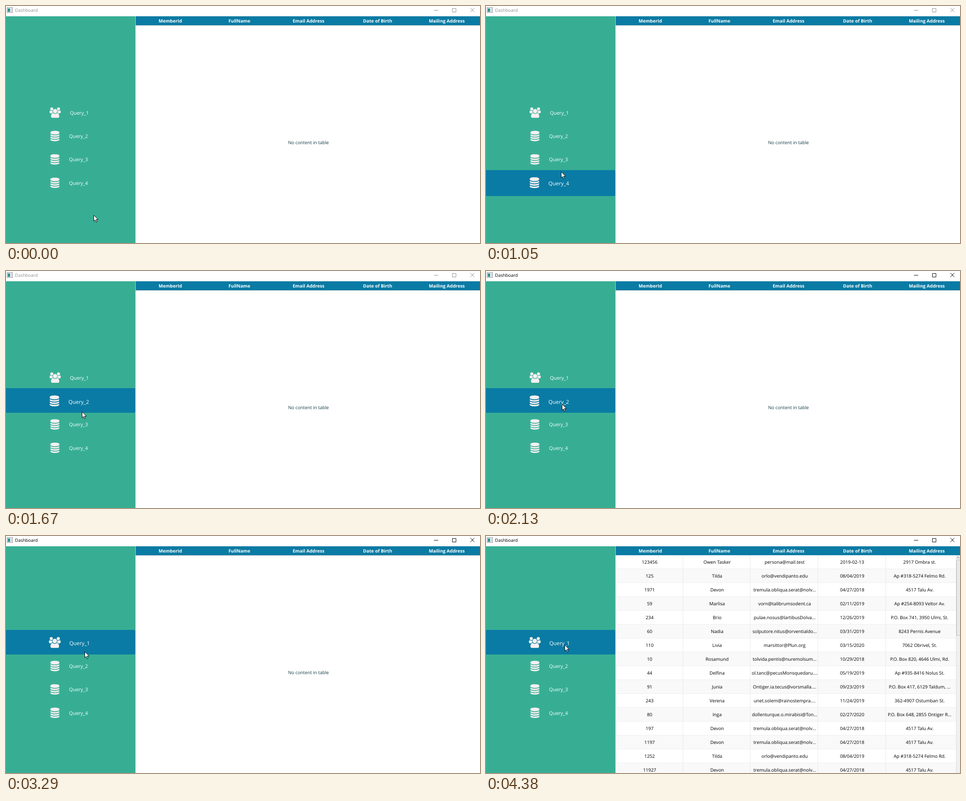
These frames come from a looping animation (1056 by 530 pixels, 5000 ms). An HTML page:

```html
<!DOCTYPE html>
<html lang="en">
<head>
<meta charset="utf-8">
<title>Dashboard</title>
<style>
  html, body { margin: 0; width: 100%; height: 100%; overflow: hidden; background: #fff; }
  svg { display: block; width: 1056px; height: 530px; }
  text { font: 500 10.2px "Open Sans", "Noto Sans", sans-serif; fill: #000; text-rendering: geometricPrecision; }
  .mid { text-anchor: middle; }
  .head { font-size: 10.1px; font-weight: 700; fill: #fff; }
  .item text { font-size: 10.8px; fill: #fff; }
  .item.on text { font-size: 11.8px; }
  .icon { fill: #f5f0f1; }
  #empty { fill: #123c46; }
  #frame text { font-size: 9.9px; fill: #8e8e8e; }
  #frame path { fill: none; stroke: #8e8e8e; }
  #frame.active text { fill: #000; }
  #frame.active path { stroke: #000; }
</style>
</head>
<body>
<svg viewBox="0 0 1056 530">
  <defs>
    <g id="people">
      <g id="side">
        <circle cx="384" cy="256" r="256"/>
        <path d="M593 896q-162 5-265 128H194Q0 1024 0 865q0-353 124-353C160 515 260 597 384 597q67 0 133-23-28 170 76 322z"/>
      </g>
      <use href="#side" transform="matrix(-1 0 0 1 1920 0)"/>
      <circle cx="960" cy="640" r="370"/>
      <path d="M602 970C700 980 780 1110 960 1110S1220 980 1318 970C1540 970 1664 1230 1664 1533Q1664 1792 1397 1792H523Q256 1792 256 1533C256 1230 380 970 602 970z"/>
    </g>
    <g id="data">
      <path d="M768 0q208 0 385 34.5t280 93.5 103 128v128q0 69-103 128t-280 93.5-385 34.5-385-34.5-280-93.5-103-128v-128q0-69 103-128t280-93.5 385-34.5z"/>
      <path id="band" d="M768 768q237 0 443-43t325-127v170q0 69-103 128t-280 93.5-385 34.5-385-34.5-280-93.5-103-128v-170q119 84 325 127t443 43z"/>
      <use href="#band" y="384"/>
      <use href="#band" y="768"/>
    </g>
  </defs>

  <rect width="1056" height="530" fill="#fff"/>
  <g id="frame">
    <rect x="2.5" y="3.5" width="12" height="11" fill="#f4f6f6" stroke="#858b8d"/>
    <rect x="4" y="5.5" width="5" height="7.5" fill="#2d8a93"/>
    <rect x="10.5" y="5.5" width="2.5" height="7.5" fill="#cfd6d8"/>
    <text x="20" y="13">Dashboard</text>
    <path d="M953.5 9.5h9.5M994.5 5.5h8v8h-8zM1034.5 4.5l9 9m0-9l-9 9"/>
  </g>

  <rect y="23" width="288" height="507" fill="#37ae94"/>
  <path d="M288.5 23V530M289 43.5H1056" stroke="#c8c8c8"/>
  <path id="glow" fill="#0a7ba4"/>
  <g id="menu"></g>

  <rect x="289" y="23" width="767" height="20" fill="#0a7ba4"/>
  <g id="heads"></g>
  <text id="empty" class="mid" x="673.8" y="308.5">No content in table</text>
  <g id="table">
    <g id="rows"></g>
    <rect x="1048" y="43" width="8" height="487" fill="#f0f0f0"/>
    <path d="M1047.5 43V530" stroke="#dcdcdc"/>
    <path d="M1049.5 49.5l2.5-3 2.5 3" fill="none" stroke="#666"/>
    <rect x="1048.5" y="53.5" width="8" height="169" rx="1" fill="#e9e9e9" stroke="#b9b9b9"/>
  </g>

  <g id="cursor">
    <path d="M.5 .8V14.2L3.6 11.3 5.9 16.6 8 15.7 5.8 10.5H10.2z" fill="#fff" stroke="#000"/>
    <circle id="click" cx=".3" r="10.9" fill="#ff0" fill-opacity=".47"/>
  </g>
</svg>
<script>
const LOOP = 5000, TICK = 75;
const ROW = 52.3, TOP = 210;
const $ = id => document.getElementById(id);

function add(parent, tag, attrs, label) {
  const el = document.createElementNS("http://www.w3.org/2000/svg", tag);
  for (const key in attrs) el.setAttribute(key, attrs[key]);
  if (label) el.textContent = label;
  return parent.appendChild(el);
}

// Side menu: the hovered item grows a little around its centre
const items = [0, 1, 2, 3].map(i => {
  const g = add($("menu"), "g", { class: "item" });
  const icon = add(g, "use", { class: "icon", href: i ? "#data" : "#people" });
  const label = add(g, "text", {}, "Query_" + (i + 1));
  return { g, icon, label };
});

function styleItem({ g, icon, label }, i, on) {
  const top = TOP + ROW * i;
  const x = (i ? 98.9 : 97) - (on ? 1.4 : 0);
  g.classList.toggle("on", on);
  icon.setAttribute("transform", `translate(${x} ${top + (on ? 16 : 16.8)}) scale(${on ? .0136 : .013})`);
  label.setAttribute("x", (i ? 140.6 : 142.4) - (on ? 1.5 : 0));
  label.setAttribute("y", top + (on ? 34.3 : 32.8));
}

function hover(row) {
  items.forEach((item, i) => styleItem(item, i, i === row));
  const top = Math.round(TOP + ROW * row), h = row === 3 ? 58 : 55;
  $("glow").setAttribute("d", row < 0 ? "" : `M0 ${top}h285q3 0 3 3v${h - 6}q0 3-3 3H0z`);
}

// Table
["MemberId", "FullName", "Email Address", "Date of Birth", "Mailing Address"].forEach((name, i) =>
  add($("heads"), "text", { class: "mid head", x: 366 + 154 * i, y: 37.2 }, name));

const tilda = "Tilda|orlo@vendipanto.edu|08/04/2019|Ap #318-5274 Felmo Rd.";
const devon = "Devon|tremula.obliqua.serat@nolv...|04/27/2018|4517 Talu Av.";
const members = [
  "123456|Owen Tasker|persona@mail.test|2019-02-13|2917 Ombra st.",
  "125|" + tilda,
  "1971|" + devon,
  "59|Marlisa|vorn@talibrumsodent.ca|02/11/2019|Ap #254-8093 Veltor Av.",
  "234|Brio|pulae.nosus@lartibusDolva...|12/26/2019|P.O. Box 741, 3950 Ulmi, St.",
  "60|Nadia|solputore.nitus@orventialdo...|03/31/2019|8243 Pernis Avenue",
  "110|Livia|marsittor@Plun.org|03/15/2020|7062 Obrivel, St.",
  "10|Rosamund|tolvida.pentis@nuremolsum...|10/29/2018|P.O. Box 820, 4646 Ulmi, Rd.",
  "44|Delfina|ol.tanc@pecusMonsquedaru....|05/19/2019|Ap #935-8416 Nolus St.",
  "91|Junia|Ontiger.ia.tecus@vorsmalla....|09/23/2019|P.O. Box 417, 6129 Taldum, ...",
  "243|Verena|unet.solem@rainostempra....|11/24/2019|362-4907 Ostumban St.",
  "80|Inga|dollenturque.o.mirabisi@Ton...|02/27/2020|P.O. Box 648, 2855 Ontiger R...",
  "197|" + devon,
  "1197|" + devon,
  "1252|" + tilda,
  "11927|" + devon
];
members.forEach((line, r) => {
  const y = 43 + 31 * r;
  add($("rows"), "rect", { x: 289, y, width: 759, height: 31, fill: r % 2 ? "#f9f9f9" : "#fff" });
  add($("rows"), "path", { d: `M289 ${y + 30.5}H1048`, stroke: "#eee" });
  line.split("|").forEach((cell, c) =>
    add($("rows"), "text", { class: "mid", x: 364.5 + 150.4 * c, y: y + 18.9 }, cell));
});
for (let c = 0; c < 4; c++)
  add($("rows"), "path", { d: `M${Math.floor(438 + 150.7 * c) + .5} 43V530`, stroke: "#e8e8e8" });

// Pointer path: time, x, y
const path = [
  [225, 195, 467], [825, 170, 399], [1050, 167, 370], [1500, 169, 323], [1950, 169, 297],
  [2550, 169, 297], [2775, 175, 280], [3225, 175, 258], [3675, 175, 243], [LOOP, 175, 243]
];

function pointer(t) {
  const i = path.findIndex(p => t < p[0]);
  if (i < 1) return path[0].slice(1);
  const [t0, x0, y0] = path[i - 1], [t1, x1, y1] = path[i];
  const k = (t - t0) / (t1 - t0);
  return [Math.round(x0 + (x1 - x0) * k), Math.round(y0 + (y1 - y0) * k)];
}

const during = (t, from, to) => t >= from && t < to;
const show = (id, on) => $(id).setAttribute("visibility", on ? "visible" : "hidden");

function draw(t) {
  const [x, y] = pointer(t - t % TICK);
  const row = Math.floor((y - TOP) / ROW);
  $("cursor").setAttribute("transform", `translate(${x} ${y})`);
  hover(row < items.length ? row : -1);
  show("click", during(t, 1970, 2130) || during(t, 3840, 3990));
  $("frame").classList.toggle("active", t >= 1970);
  show("table", t >= 4380);
  show("empty", t < 4380);
}

const start = performance.now();
function tick() {
  draw((performance.now() - start) % LOOP);
  requestAnimationFrame(tick);
}
tick();
</script>
</body>
</html>
```
